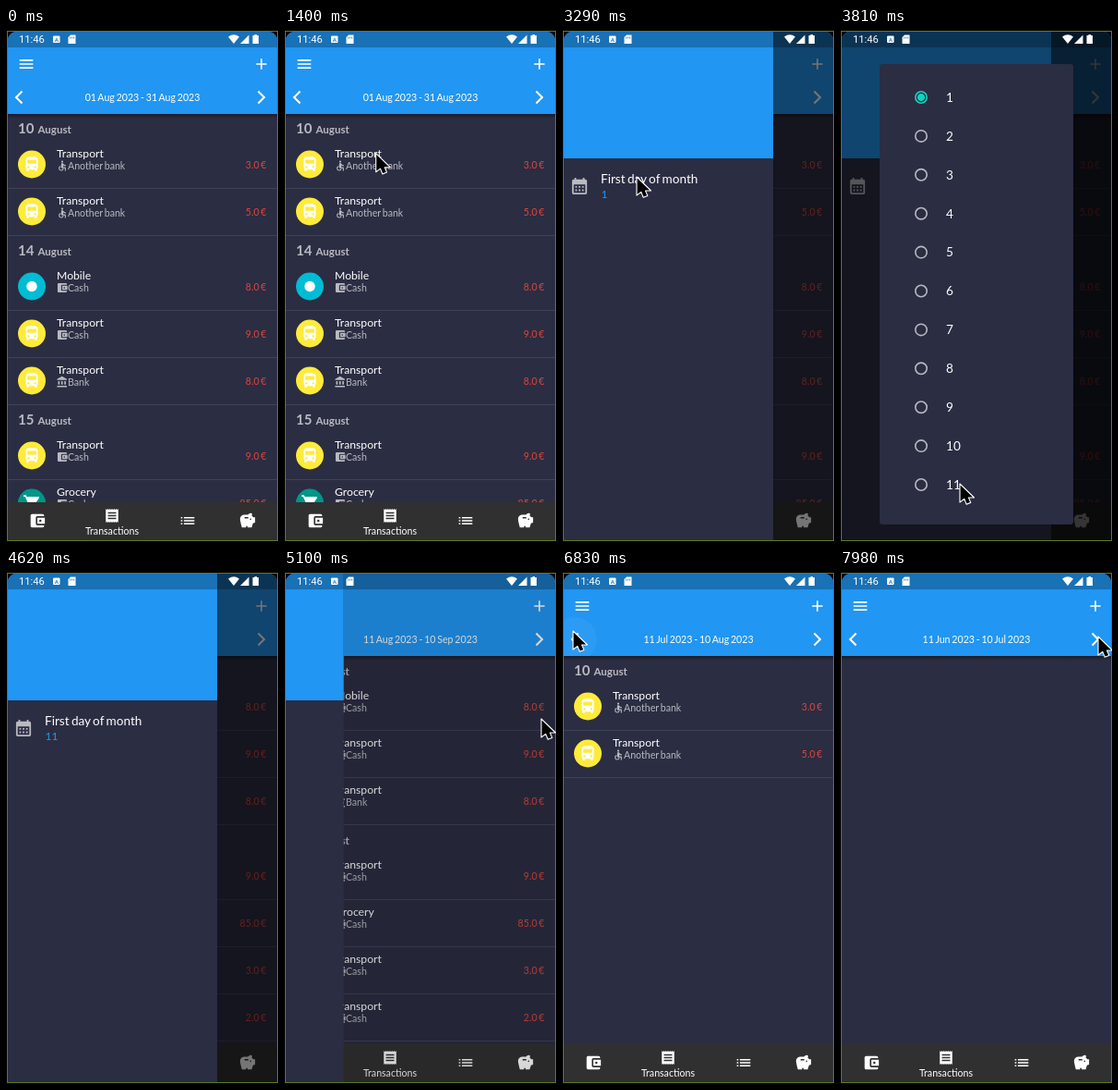
An HTML page for the animation above (8 s loop, 295 by 556 pixels).

```html
<!DOCTYPE html>
<html lang="en">
<head>
<meta charset="utf-8">
<title>Budget period start</title>
<style>
  html, body { margin: 0; width: 100%; height: 100%; overflow: hidden; background: #000; }
  svg { display: block; width: 100vw; height: 100vh; font-family: Lato, sans-serif; fill: #fff; }
  text { word-spacing: -.085em; }
  path { fill-rule: evenodd; }
  .small { font-size: 10.6px; }
  .title { font-size: 12.2px; }
  .large { font-size: 13.6px; }
  .muted { fill: #b9bac1; }
  .amount { fill: #dc463f; text-anchor: end; }
  .mid { text-anchor: middle; }
  .day { font-size: 15px; font-weight: 700; }
  .month { font-size: 11.5px; font-weight: 700; }
</style>
</head>
<body>
<svg id="stage" viewBox="0 0 295 556"></svg>
<script>
const LOOP = 8000;
const BLUE = '#2196f3', PANEL = '#2b2d42', TEAL = '#12d4bf';
const start = performance.now();

const disc = (x, y, r) => `M${x - r} ${y}a${r} ${r} 0 1 0 ${2 * r} 0a${r} ${r} 0 1 0 ${-2 * r} 0z`;

// Icons on a 24 x 24 grid.
const ICONS = {
  menu: 'M3 18h18v-2H3zm0-5h18v-2H3zm0-7v2h18V6z',
  add: 'M19 13h-6v6h-2v-6H5v-2h6V5h2v6h6z',
  bus: 'M4 6c0-3.5 3.5-4 8-4s8 .5 8 4v10q0 1.4-1 2.2V21h-3v-2H8v2H5v-2.8Q4 17.4 4 16zM6 6v5h12V6z'
    + disc(7.5, 15.5, 1.5) + disc(16.5, 15.5, 1.5),
  dot: disc(12, 12, 7),
  cart: 'M1 2h3.3l.9 2H21q1.3.3.8 1.5L17.3 12q-.6 1-1.7 1H8.1l-1 2H19v2H7q-2.7-.4-1.8-3l1.4-2.4L3 4H1z'
    + disc(7, 20, 2) + disc(17, 20, 2),
  wallet: 'M21 18v1q0 2-2 2H5q-2 0-2-2V5q0-2 2-2h14q2 0 2 2v1h-9q-2 0-2 2v8q0 2 2 2zm-9-2h10V8H12z'
    + disc(16, 12, 1.5),
  bank: 'M4 10v7h3v-7zm6 0v7h3v-7zM2 22h19v-3H2zm14-12v7h3v-7zM11.5 1L2 6v2h19V6z',
  wheelchair: disc(12, 4, 2)
    + 'M10 9q.5-3 3-1.8Q15.5 11 19 11v2q-3 0-5-2v3.5h3q2 0 2 2V22h-2v-5h-5q-2 0-2-2z'
    + 'M9 12.1v2.1A3 3 0 1 0 12.8 18h2.1A5 5 0 1 1 9 12.1z',
  receipt: 'M3 2' + 'l1.5 1.5l1.5-1.5'.repeat(6) + 'v20' + 'l-1.5-1.5l-1.5 1.5'.repeat(6) + 'z'
    + [7, 11, 15].map(y => `M6 ${y}v2h12v-2z`).join(''),
  list: [7, 11, 15].map(y => `M3 ${y}h2v2H3zM7 ${y}h14v2H7z`).join(''),
  piggy: 'M19.8 7.5l-2.3-2.3Q18 4 18 3.5 18 2 16.5 2q-2.5 0-4 2h-5C4.5 4 2 6.5 2 9.5S4.5 21 4.5 21H10v-2h2v2h5.5'
    + 'l1.7-5.6 2.8-.9v-7zM13 9H8V7h5z' + disc(16, 10, 1),
  calendar: 'M19 4h-1V2h-2v2H8V2H6v2H5Q3 4 3 6v14q0 2 2 2h14q2 0 2-2V6q0-2-2-2zm0 16H5V10h14z'
    + [7, 11, 15].map(x => `M${x} 12h2v2h-2zm0 4h2v2h-2z`).join('')
};

const rect = (x, y, w, h, fill, more = '') =>
  `<rect x="${x}" y="${y}" width="${w}" height="${h}" fill="${fill}" ${more}/>`;
const text = (x, y, cls, str, more = '') => `<text x="${x}" y="${y}" class="${cls}" ${more}>${str}</text>`;
const icon = (name, x, y, scale = .814, cls = '') =>
  `<path class="${cls}" d="${ICONS[name]}" transform="translate(${x} ${y}) scale(${scale}) translate(-12 -12)"/>`;
const chevron = (x, y, dir) =>
  `<path d="M${x - 3.5 * dir} ${y - 6.5}l${6.5 * dir} 6.5l${-6.5 * dir} 6.5" fill="none" stroke="#fff" stroke-width="2.1"/>`;

const KINDS = {
  Transport: ['#ffeb3b', 'bus'],
  Mobile: ['#00bcd4', 'dot'],
  Grocery: ['#009688', 'cart']
};
const ACCOUNTS = { Cash: 'wallet', Bank: 'bank', 'Another bank': 'wheelchair' };

const AUG_10 = ['10', ['Transport', 'Another bank', '3.0'], ['Transport', 'Another bank', '5.0']];
const AUG_14 = ['14', ['Mobile', 'Cash', '8.0'], ['Transport', 'Cash', '9.0'], ['Transport', 'Bank', '8.0']];
const AUG_15 = ['15', ['Transport', 'Cash', '9.0'], ['Grocery', 'Cash', '85.0'],
  ['Transport', 'Cash', '3.0'], ['Transport', 'Cash', '2.0']];

const PERIODS = [
  { from: 0, label: '01 Aug 2023 - 31 Aug 2023', days: [AUG_10, AUG_14, AUG_15] },
  { from: 4230, label: '11 Aug 2023 - 10 Sep 2023', days: [AUG_14, AUG_15] },
  { from: 6670, label: '11 Jul 2023 - 10 Aug 2023', days: [AUG_10] },
  { from: 7570, label: '11 Jun 2023 - 10 Jul 2023', days: [] }
];

function transaction(y, [kind, account, amount]) {
  const [color, glyph] = KINDS[kind];
  return `<circle cx="28" cy="${y + 25.5}" r="15" fill="${color}"/>` + icon(glyph, 28, y + 25.5)
    + text(55, y + 17.7, 'title', kind)
    + icon(ACCOUNTS[account], 61, y + 27, .56, 'muted')
    + text(67, y + 30.5, 'small muted', account)
    + text(282.5, y + 30, 'small amount', amount + ' €')
    + rect(2, y + 51, 292, 1, '#404255');
}

function transactionList(days) {
  let y = 92, out = '';
  for (const [day, ...rows] of days) {
    out += text(13, y + 22.3, 'day muted', day) + text(34.5, y + 22.3, 'month muted', 'August');
    y += 30;
    for (const row of rows) {
      out += transaction(y, row);
      y += 51;
    }
  }
  return out;
}

const periods = PERIODS.map(p => `<g class="period">${transactionList(p.days)}</g>`).join('');

const appBar = rect(0, 93, 295, 5, 'url(#shadow)') + rect(0, 3, 295, 90, BLUE)
  + icon('menu', 22, 39) + icon('add', 277, 39)
  + '<circle id="ripple" cx="14" cy="75" clip-path="url(#toolbar)"/>'
  + chevron(14, 75, -1) + chevron(277, 75, 1)
  + text(148, 78.8, 'small mid', '', 'id="range"');

const navBar = rect(0, 513, 295, 42, '#303030')
  + icon('wallet', 34, 533) + icon('receipt', 115, 527.5, .75) + icon('list', 197, 533)
  + icon('piggy', 262, 533) + text(115, 547.5, 'small mid', 'Transactions');

const drawer = rect(1, 3, 228, 552, PANEL) + rect(1, 3, 228, 138, BLUE)
  + icon('calendar', 19, 171, .9, 'muted')
  + text(42, 168, 'large', 'First day of month')
  + text(42.5, 184, '', '', `id="firstDay" font-size="12" fill="${BLUE}"`);

const options = Array.from({ length: 11 }, (_, i) => {
  const y = 75 + i * 41.9;
  return `<g class="option" fill="${TEAL}"><circle cx="88" cy="${y}" r="6.2" fill="none" stroke-width="1.6"/>
    <circle cx="88" cy="${y}" r="3.6"/></g>` + text(115, y + 4.8, 'large', i + 1);
}).join('');

const statusBar = rect(0, 3, 295, 18, '#000', 'opacity=".25"')
  + text(14, 16, '', '11:46', 'font-size="11.2" style="font-family:Roboto,sans-serif"')
  + rect(51, 8.5, 7.5, 7.5, '#fff', 'rx="1"')
  + text(54.8, 14.6, 'mid', 'A', 'font-size="6" font-weight="700" fill="#1971b6"')
  + '<path d="M70 7.5h5.5v9.5H67.5v-7z"/><path d="M69.6 9.5v2m2-2v2m2-2v2" stroke="#1971b6" stroke-width=".8"/>'
  + '<path d="M241 9.5q6-4.5 12 0l-6 7.5zM263.5 7.5v9.5H254z"/>'
  + '<path d="M269.5 7h2.500v1h2v9h-6.5V8h2z"/>';

const stage = document.getElementById('stage');
stage.innerHTML = `
  <clipPath id="screen"><path d="M1 555V18Q1 3 16 3h264q15 0 15 15v537z"/></clipPath>
  <clipPath id="toolbar"><rect y="50" width="295" height="43"/></clipPath>
  <linearGradient id="shadow" x2="0" y2="1">
    <stop stop-color="#000" stop-opacity=".4"/><stop offset="1" stop-color="#000" stop-opacity="0"/>
  </linearGradient>
  ${rect(0, 0, 295, 556, '#000')}
  <g clip-path="url(#screen)">
    ${rect(0, 0, 295, 556, PANEL)}
    ${periods}${navBar}${appBar}
    ${rect(0, 0, 295, 556, '#000', 'id="scrim"')}
    <g id="drawer">${drawer}</g>
    ${rect(0, 0, 295, 556, '#000', 'id="barrier"')}
    <g id="dialog">${rect(43, 39, 210, 498, PANEL, 'rx="3"')}${options}</g>
    ${statusBar}
  </g>
  ${rect(1.5, 3.5, 293, 551, 'none', 'stroke="#5f7d1e"')}
  <path id="cursor" d="M0 0V20L4.8 16.4 7.2 22.3 11.8 20.4 9.5 15h6z" fill="#000"
    stroke="#fff" stroke-width="1.1" stroke-linejoin="round"/>`;

const $ = id => document.getElementById(id);
const periodGroups = stage.querySelectorAll('.period');
const optionGroups = stage.querySelectorAll('.option');

// Pointer keys: time, x, y.
const POINTER = [
  [760, 22, 199], [1000, 192, 100], [1100, 192, 100], [1240, 165, 137], [1400, 100, 136],
  [1530, 60, 96], [1640, 76, 58], [1760, 120, 45], [1860, 160, 56], [1940, 172, 78],
  [2020, 110, 55], [2190, 12, 20], [2270, 12, 20], [2340, 39, 58], [2500, 26, 45],
  [2820, 26, 45], [3120, 84, 155], [3290, 81, 161], [3440, 81, 161], [3810, 130, 493],
  [3910, 129, 491], [4250, 129, 491], [4620, 298, 165], [4700, 298, 165], [4860, 279, 161],
  [5200, 279, 161], [5790, 44, 80], [5930, 9, 66], [6040, 9, 66], [6110, 16, 66],
  [6370, 16, 66], [6440, 12, 66], [7600, 12, 66], [7980, 280, 72], [LOOP, 280, 72]
];

function pointerAt(t) {
  const next = POINTER.findIndex(key => key[0] > t);
  const [t0, x0, y0] = POINTER[next - 1], [t1, x1, y1] = POINTER[next];
  const k = (t - t0) / (t1 - t0);
  return [x0 + (x1 - x0) * k, y0 + (y1 - y0) * k];
}

const progress = (t, from, duration) => Math.min(1, Math.max(0, (t - from) / duration));
const easeOut = k => 1 - (1 - k) ** 3;

function draw(t) {
  const current = PERIODS.findLastIndex(p => t >= p.from);
  periodGroups.forEach((g, i) => g.setAttribute('display', i === current ? 'inline' : 'none'));
  $('range').textContent = PERIODS[current].label;

  const open = easeOut(progress(t, 2640, 300)) - easeOut(progress(t, 5000, 300));
  $('scrim').setAttribute('opacity', .54 * open);
  $('drawer').setAttribute('transform', `translate(${-232 * (1 - open)} 0)`);

  const shown = progress(t, 3340, 160) - progress(t, 4150, 160);
  $('barrier').setAttribute('opacity', .54 * shown);
  $('dialog').setAttribute('opacity', shown);

  const selected = t < 4150 ? 1 : 11;
  $('firstDay').textContent = selected;
  optionGroups.forEach((g, i) => {
    const on = i + 1 === selected;
    g.setAttribute('stroke', on ? TEAL : '#b8b9c0');
    g.lastElementChild.setAttribute('opacity', on ? 1 : 0);
  });

  const tap = Math.max(progress(t, 6630, 260) % 1, progress(t, 7530, 260) % 1);
  $('ripple').setAttribute('r', 24 * easeOut(tap));
  $('ripple').setAttribute('opacity', tap ? .22 * (1 - tap) : 0);

  const visible = t >= POINTER[0][0];
  $('cursor').setAttribute('display', visible ? 'inline' : 'none');
  if (visible) $('cursor').setAttribute('transform', `translate(${pointerAt(t)})`);
}

function frame() {
  draw((performance.now() - start) % LOOP);
  requestAnimationFrame(frame);
}
frame();
</script>
</body>
</html>
```
